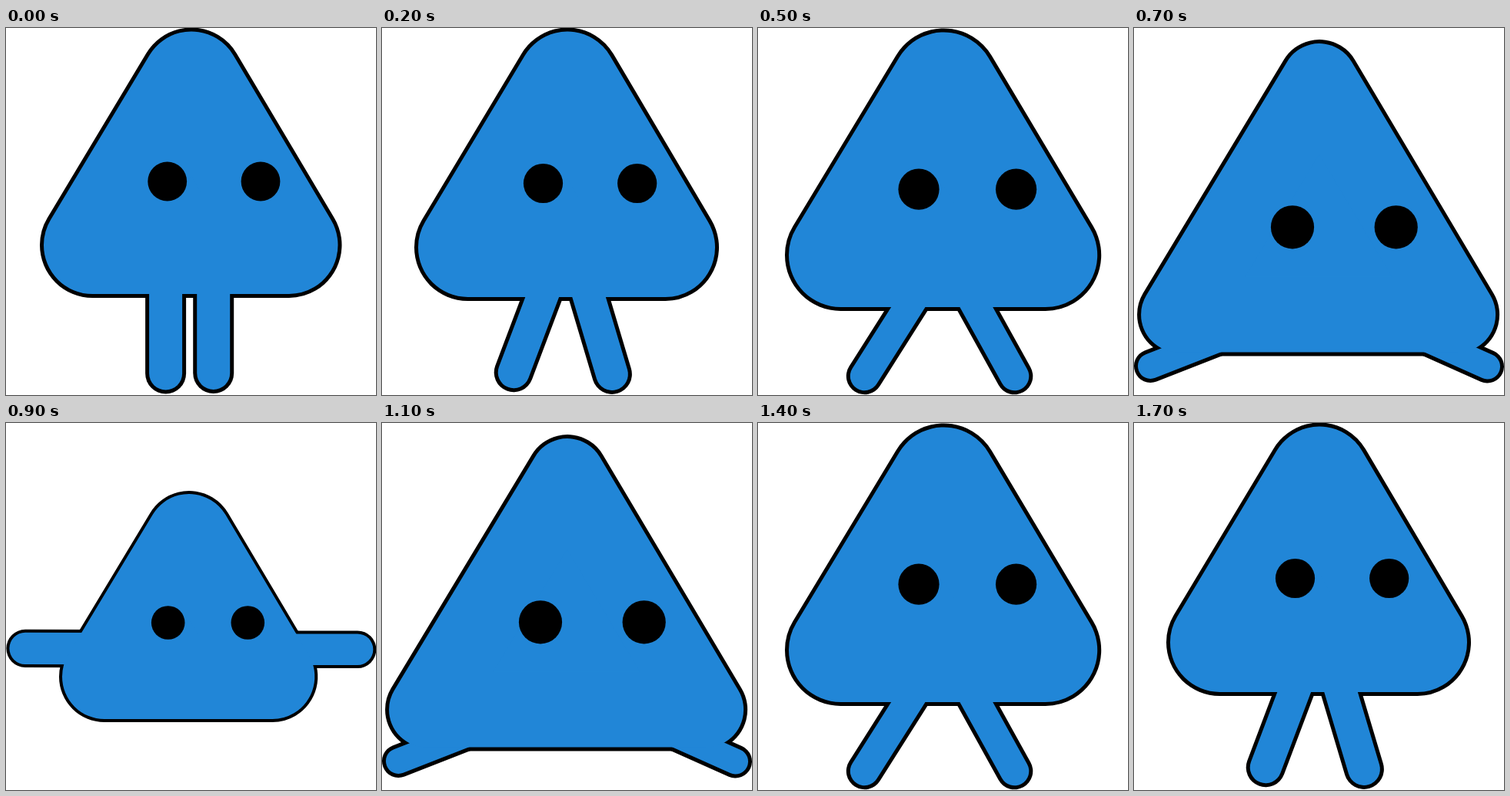
An HTML page with a canvas that plays this animation: 481x476 px, repeating every 1900 ms.

```html
<!DOCTYPE html>
<html lang="en">
<head>
<meta charset="utf-8">
<title>Bouncing triangle</title>
<style>
  html, body { margin: 0; width: 100%; height: 100%; overflow: hidden; background: #fff; }
  canvas { display: block; }
</style>
</head>
<body>
<canvas id="stage" width="481" height="476"></canvas>
<script>
const ctx = document.getElementById('stage').getContext('2d');
const BLUE = '#2186d7';

// body: corner centres and corner radius; legs: foot, hip, radius; eyes: left x, right x, y, radius
const stand = {
  body: [[241, 68], [368, 281.5], [112.5, 281.5]], round: 66, line: 5,
  legs: [[207.6, 448, 207.6, 310, 24], [269.7, 447.5, 269.7, 310, 24]],
  eyes: [209.7, 331, 199, 25.4]
};
const sway = {
  body: [[241, 69], [368.5, 284.5], [111.5, 284.5]], round: 67, line: 5,
  legs: [[171.2, 446.7, 222.6, 311, 23], [299, 449, 257.7, 311, 23.4]],
  eyes: [209.5, 331.7, 201.5, 25.6]
};
const split = {
  body: [[241.5, 73], [373.7, 294.5], [107.5, 294.5]], round: 70, line: 5,
  legs: [[138.5, 451.5, 222, 320, 21.2], [333.5, 451.5, 260.5, 320, 21.3]],
  eyes: [209, 335.6, 209.2, 26.6]
};
const crouch = {
  body: [[241, 69], [421.2, 371.7], [58, 371.7]], round: 51.4, line: 5,
  legs: [[21.5, 438.5, 115, 402, 19], [459.5, 439, 376.5, 402, 19]],
  eyes: [206, 340.7, 258.3, 28.1]
};
const flat = {
  body: [[238, 147], [346.3, 329], [128, 329]], round: 57, line: 4,
  legs: [[25, 292.4, 130, 292.6, 22.6], [457, 293.7, 346, 293.7, 22.3]],
  eyes: [210.7, 314.3, 259, 21.8]
};

const LOOP = 1900;
const steps = [
  [0, stand], [200, sway], [500, split], [700, crouch],
  [900, flat], [1100, crouch], [1400, split], [1700, sway]
];

// Silhouette of body and legs, grown by `grow` pixels
function silhouette(pose, color, grow) {
  ctx.strokeStyle = ctx.fillStyle = color;
  ctx.lineJoin = ctx.lineCap = 'round';
  for (const [x, y, hipX, hipY, r] of pose.legs) {
    ctx.lineWidth = 2 * (r + grow);
    ctx.beginPath();
    ctx.moveTo(x, y);
    ctx.lineTo(hipX, hipY);
    ctx.stroke();
  }
  ctx.lineWidth = 2 * (pose.round + grow);
  ctx.beginPath();
  for (const [x, y] of pose.body) ctx.lineTo(x, y);
  ctx.closePath();
  ctx.fill();
  ctx.stroke();
}

function draw(pose) {
  ctx.fillStyle = '#fff';
  ctx.fillRect(0, 0, 481, 476);
  silhouette(pose, '#000', pose.line / 2);
  silhouette(pose, BLUE, -pose.line / 2);
  const [left, right, y, r] = pose.eyes;
  ctx.fillStyle = '#000';
  for (const x of [left, right]) {
    ctx.beginPath();
    ctx.arc(x, y, r, 0, 2 * Math.PI);
    ctx.fill();
  }
}

const start = performance.now();
function tick() {
  const t = (performance.now() - start) % LOOP;
  draw(steps.findLast(([at]) => at <= t)[1]);
  requestAnimationFrame(tick);
}
tick();
</script>
</body>
</html>
```
